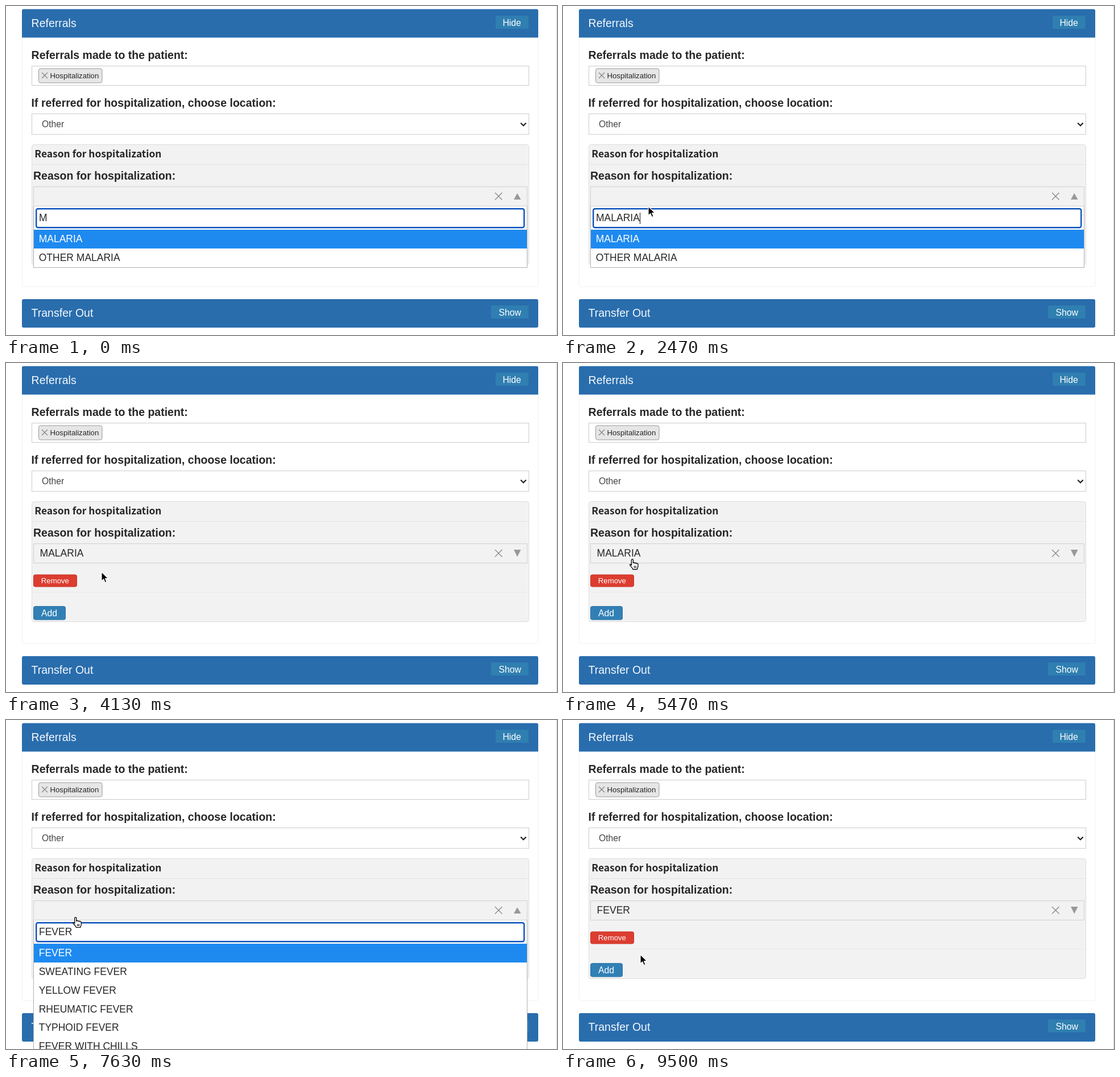
Recreate the animation shown at these times as an HTML page. Size 969 by 578 pixels, loop 9.61 s.

```html
<!DOCTYPE html>
<html lang="en">
<head>
<meta charset="utf-8">
<title>Referral form</title>
<style>
  html, body { margin: 0; width: 100%; height: 100%; overflow: hidden; background: #fff; }
  svg { display: block; width: 100vw; height: 100vh; }
  text { font-family: "Liberation Sans", Arial, sans-serif; font-size: 17.5px; fill: #262626; white-space: pre; }
  .label { font-size: 19.5px; font-weight: bold; }
  .head { font-size: 19.5px; fill: #f4f8fc; }
  .btn { font-size: 15.8px; fill: #fff; }
  .small { font-size: 13.2px; }
  .mid { font-size: 15.7px; fill: #444; }
  .title { font: bold 17.4px "Noto Sans CJK JP", "Noto Sans CJK SC", "Noto Sans", sans-serif; }
  .bar { fill: #296dad; }
  .tool { fill: #2f7fb1; }
  .field { fill: #fff; stroke: #ccc; }
  .line { fill: none; stroke: #e3e3e3; }
  .cross { fill: none; stroke: #8a8a8a; stroke-width: 1.4; }
</style>
</head>
<body>
<svg viewBox="0 0 969 578" preserveAspectRatio="none">
  <path d="M968.5 0V578" stroke="#d6d6d6"/>

  <!-- referrals panel -->
  <path id="panel" fill="#fff" stroke="#f1f1f1"/>
  <path class="bar" d="M28 55.5V8.500a3 3 0 0 1 3-3H933a3 3 0 0 1 3 3V55.5z"/>
  <text class="head" x="44.600" y="37.300">Referrals</text>
  <rect class="tool" x="861" y="17" width="58" height="23" rx="2"/>
  <text class="btn" x="873.400" y="34.500">Hide</text>

  <text class="label" x="44.600" y="93">Referrals made to the patient:</text>
  <rect class="field" x="45.500" y="105.500" width="874" height="34"/>
  <rect x="57.500" y="110" width="111.500" height="25" rx="3.500" fill="#e6e6e6" stroke="#999"/>
  <path class="cross" d="M63 117l10 10m0-10l-10 10" stroke-width="1.200"/>
  <text class="small" x="77.500" y="127">Hospitalization</text>

  <text class="label" x="44.600" y="177">If referred for hospitalization, choose location:</text>
  <rect class="field" x="45.500" y="189.500" width="874" height="36"/>
  <text class="mid" x="63" y="213.300">Other</text>
  <path d="M905.200 205.500l4.700 4.700 4.700-4.700" fill="none" stroke="#222" stroke-width="2.200"/>

  <!-- reason card -->
  <rect id="card" x="45.500" y="243.500" width="874" rx="4" fill="#f2f2f2" stroke="#ddd"/>
  <path class="line" d="M46 278.500H919"/>
  <text class="title" x="50.300" y="265.500">Reason for hospitalization</text>
  <text class="label" x="48" y="305">Reason for hospitalization:</text>
  <rect x="48.500" y="317.500" width="868" height="34" fill="#f2f2f2" stroke="#d0d0d0"/>
  <text id="value" x="59.600" y="340"></text>
  <path class="cross" d="M860 328l12.500 12.500m0-12.500l-12.500 12.500"/>
  <path id="toggle" fill="#999"/>
  <text id="wait" x="48" y="371">resolving....</text>

  <!-- everything pushed down while resolving -->
  <g id="below">
    <rect x="48.500" y="372" width="76" height="21" rx="3" fill="#dc3d30" stroke="#c93629"/>
    <text class="small" x="61.800" y="387" style="fill:#fff">Remove</text>
    <path class="line" d="M48 402.500H918" style="stroke:#e9e9e9"/>
    <rect x="48.500" y="427.500" width="56" height="23.500" rx="3" fill="#3180b5" stroke="#2b73a6"/>
    <text class="btn" x="62" y="445">Add</text>
    <rect class="bar" x="28" y="515" width="908" height="50" rx="3"/>
    <text class="head" x="44.600" y="546.300">Transfer Out</text>
    <rect class="tool" x="853" y="526" width="66" height="23" rx="2"/>
    <text class="btn" x="866.500" y="543.500">Show</text>
  </g>

  <!-- dropdown -->
  <g id="drop">
    <path id="sheet" fill="#fff" stroke="#b0b0b0"/>
    <path d="M48 351.500H917" stroke="#d0d0d0"/>
    <rect id="search" fill="#fff"/>
    <text id="query" x="58" y="378"></text>
    <rect id="caret" y="363" width="1" height="20" fill="#111"/>
    <g id="rows"></g>
  </g>

  <g id="cursor" stroke-linejoin="round">
    <path id="arrow" fill="#000" stroke="#fff" stroke-width="1.200"
      d="M0 0V16.200L3.700 12.700 6.300 18.700 9 17.500 6.500 11.700H11.600z"/>
    <path id="hand" fill="#fff" stroke="#000" stroke-width="1.300"
      d="M-1.600 10.500V1.200a1.500 1.500 0 0 1 3 0V6.500c.4-1.200 2.700-1 2.900.3 .6-1 2.700-.7 2.900.6 .8-.8 2.600-.3 2.700 1.200
         V12c0 2-1.300 3-1.500 5.500H1C.5 15-3 12.500-4.200 10.200c-.8-1.600 1.200-2.400 2.600.3zM3.500 11.500V15M6 11.500V15"/>
  </g>
</svg>
<script>
const LOOP = 9610, SHIFT = 24, PITCH = 32.75;
const $ = id => document.getElementById(id);
const set = (id, attrs) => { for (const k in attrs) $(id).setAttribute(k, attrs[k]); };
const show = (id, on) => { $(id).style.display = on ? "" : "none"; };

const lists = {
  none: [],
  picked: ["MALARIA"],
  malaria: ["MALARIA", "OTHER MALARIA"],
  mala: ["MALAISE", "MALABSORPTION", "MALARIA", "OTHER MALARIA", "MALAISE AND FATIGUE"],
  mal: ["WAIST CIRCUMFERENCE MALE, LESS THAN 102CM", "SEVERE ACUTE MALNUTRITION", "MALIGNANT",
        "MALNUTRITION", "MALIGNANCY", "WAIST CIRCUMFERENCE MALE, GREATER THAN 102CM"],
  fever: ["FEVER", "SWEATING FEVER", "YELLOW FEVER", "RHEUMATIC FEVER", "TYPHOID FEVER", "FEVER WITH CHILLS"]
};

// Each step changes only the named parts of the form.
const steps = [
  [0, { query: "M", list: "malaria", open: 1, focus: 1, caret: 0, value: "", wait: 0 }],
  [70, { query: "" }],
  [470, { caret: 1 }],
  [700, { query: "M" }],
  [870, { query: "MA" }],
  [1000, { query: "MAL" }],
  [1500, { caret: 0 }],
  [1670, { query: "MALA", caret: 1 }],
  [1730, { list: "mal" }],
  [1800, { query: "MALAR" }],
  [1870, { query: "MALARI" }],
  [1930, { list: "malaria" }],
  [2100, { list: "mala" }],
  [2270, { query: "MALARIA" }],
  [2330, { list: "malaria" }],
  [2770, { caret: 0 }],
  [3270, { caret: 1 }],
  [3370, { focus: 0, caret: 0 }],
  [3470, { open: 0, value: "MALARIA", wait: 1 }],
  [3570, { wait: 0 }],
  [5500, { open: 1, query: "", list: "picked", focus: 1, caret: 1 }],
  [6000, { caret: 0 }],
  [6470, { caret: 1 }],
  [6670, { query: "F", list: "none" }],
  [6770, { query: "FE" }],
  [6870, { query: "FEV" }],
  [6970, { query: "FEVE" }],
  [7100, { query: "FEVER" }],
  [7470, { list: "fever", value: "" }],
  [7600, { caret: 0 }],
  [8100, { caret: 1 }],
  [8470, { focus: 0, caret: 0 }],
  [8630, { open: 0, value: "FEVER", wait: 1 }],
  [8670, { wait: 0 }]
];

// Pointer visits, each a list of [time, x, y].
const visits = [
  [[2470, 150, 352], [3000, 131, 399], [3300, 127, 403], [3500, 127, 403], [4130, 168, 367],
   [4470, 168, 367], [4640, -14, 345]],
  [[5000, 28, 330], [5130, 122, 345], [6670, 122, 345]],
  [[7570, 122, 345], [8170, 136, 412], [LOOP, 136, 412]]
];

function pointerAt(t) {
  const path = visits.find(v => t >= v[0][0] && t < v[v.length - 1][0]);
  if (!path) return null;
  const i = path.findIndex(p => p[0] > t);
  const [t0, x0, y0] = path[i - 1], [t1, x1, y1] = path[i];
  const u = (t - t0) / (t1 - t0), e = u * u * (3 - 2 * u);
  return [x0 + (x1 - x0) * e, y0 + (y1 - y0) * e];
}

function drawRows(items) {
  const rows = $("rows"), ns = "http://www.w3.org/2000/svg";
  rows.replaceChildren();
  const add = (tag, attrs) => {
    const el = document.createElementNS(ns, tag);
    for (const k in attrs) el.setAttribute(k, attrs[k]);
    return rows.appendChild(el);
  };
  if (items.length) add("rect", { x: 49, y: 393, width: 867, height: 33, fill: "#1e8af0" });
  items.forEach((item, i) => {
    const row = add("text", { x: 57.7, y: 415.4 + i * PITCH });
    row.textContent = item;
    if (!i) row.style.fill = "#fff";
  });
}

function drawForm(s) {
  const dy = s.wait ? SHIFT : 0;
  $("value").textContent = s.value;
  show("wait", s.wait);
  set("below", { transform: `translate(0 ${dy})` });
  set("card", { height: 211 + dy });
  set("panel", { d: `M28.500 55V${490 + dy}a3 3 0 0 0 3 3H933a3 3 0 0 0 3-3V55` });
  set("toggle", { d: s.open ? "M893 340H905.500L899.200 329z" : "M893 328H905.500L899.200 340.500z" });
  show("drop", s.open);
  if (!s.open) return;

  const items = lists[s.list];
  const bottom = items.length ? Math.round(393 + items.length * PITCH) + 0.5 : 402.5;
  set("sheet", { d: `M48.500 351.500V${items.length > 5 ? 600 : bottom}H916.500V351.500` });
  set("search", s.focus
    ? { x: 53.2, y: 356.2, width: 858, height: 33, rx: 3, stroke: "#0d52bd", "stroke-width": 2.4 }
    : { x: 52.5, y: 355.5, width: 859, height: 34, rx: 1, stroke: "#dcdcdc", "stroke-width": 1 });
  $("query").textContent = s.query;
  show("caret", s.caret);
  set("caret", { x: 58 + Math.round(s.query ? $("query").getComputedTextLength() : 0) });
  drawRows(items);
}

let last = -1;
function render(t) {
  let n = 0;
  while (n < steps.length && steps[n][0] <= t) n++;
  if (n !== last) {
    drawForm(Object.assign({}, ...steps.slice(0, n).map(s => s[1])));
    last = n;
  }
  const p = pointerAt(t);
  show("cursor", p);
  if (!p) return;
  const [x, y] = p, onSelect = x > 48 && x < 917 && y > 317 && y < 351;
  set("cursor", { transform: `translate(${x.toFixed(1)} ${y.toFixed(1)})` });
  show("hand", onSelect);
  show("arrow", !onSelect);
}

const start = performance.now();
function tick() {
  render((performance.now() - start) % LOOP);
  requestAnimationFrame(tick);
}
tick();
</script>
</body>
</html>
```
